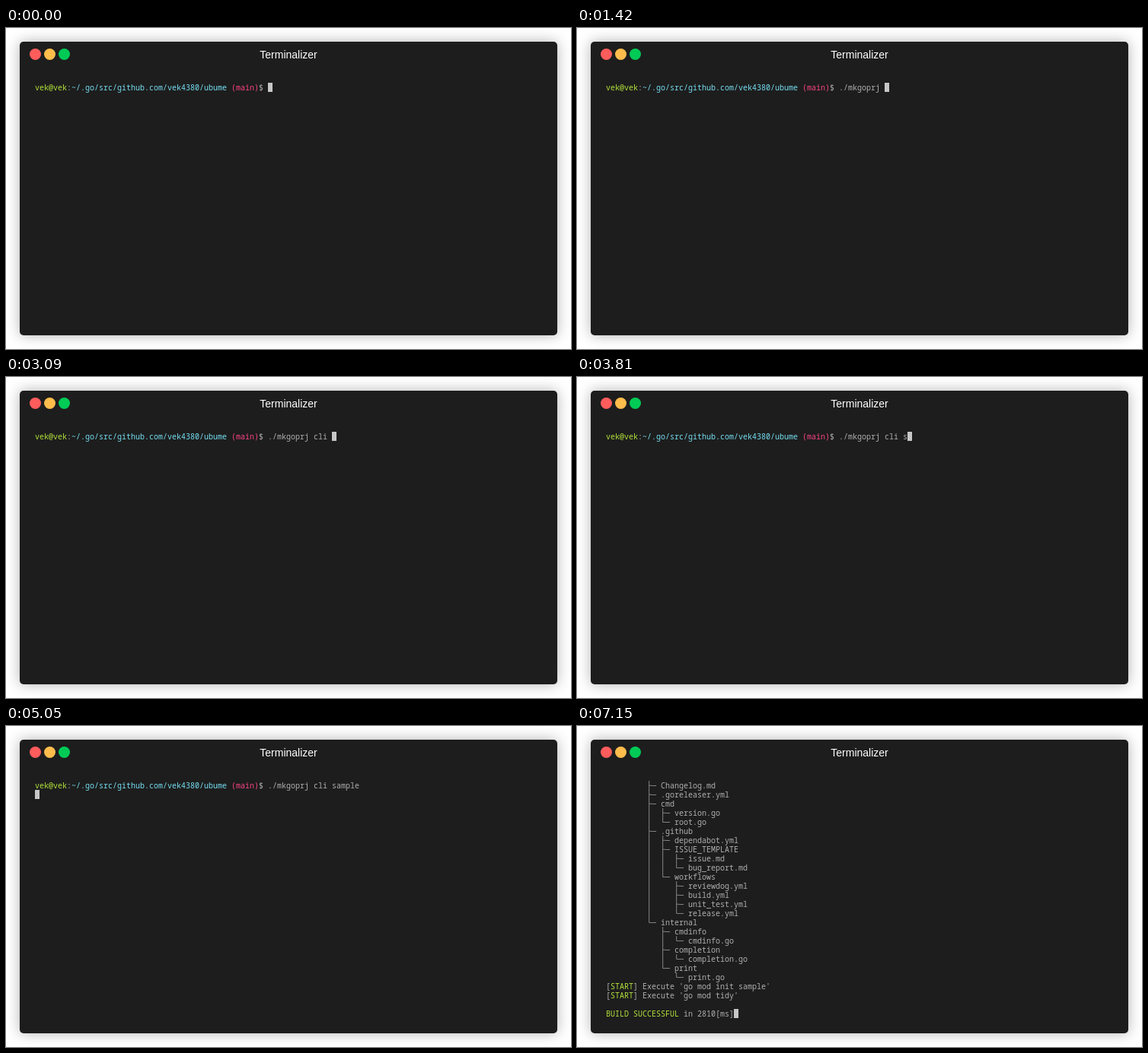
These frames come from a looping animation (742 px wide and 422 px high, 7.76 s). An HTML page:

```html
<!DOCTYPE html>
<html lang="en">
<head>
<meta charset="utf-8">
<title>Terminal session</title>
<style>
  html, body { margin: 0; width: 100%; height: 100%; overflow: hidden; background: #fff; }
  .window {
    position: absolute; left: 18px; top: 18px; width: 706px; height: 386px;
    border-radius: 5px; background: #1d1d1d; box-shadow: 0 0 18px rgba(0, 0, 0, .3);
  }
  .button { position: absolute; top: 9px; width: 15px; height: 15px; border-radius: 50%; }
  .title {
    position: absolute; top: 9px; width: 100%; text-align: center; color: #fff;
    font: 14px/16px "Liberation Sans", Arial, sans-serif;
  }
  pre {
    position: absolute; left: 20px; top: 54px; margin: 0; color: #afafaf;
    font: 10px/12px "Noto Sans Mono", "DejaVu Sans Mono", monospace;
    font-variant-ligatures: none;
  }
  .green { color: #b3e33b; }
  .blue { color: #75dff2; }
  .red { color: #fc4384; }
  #cursor { position: absolute; width: 6px; height: 12px; background: #c7c7c7; }
</style>
</head>
<body>
<div class="window">
  <div class="button" style="left:13px;background:#ff5c5c"></div>
  <div class="button" style="left:32px;background:#ffbd4c"></div>
  <div class="button" style="left:51px;background:#00ca56"></div>
  <div class="title">Terminalizer</div>
  <pre id="screen"></pre>
  <div id="cursor"></div>
</div>
<script>
const LOOP = 7760;
const ROWS = 26;
const screenEl = document.getElementById('screen');
const cursorEl = document.getElementById('cursor');

const paint = (color, text) => `<span class="${color}">${text}</span>`;
const start = command => `[${paint('green', 'START')}] Execute '${command}'`;

const prompt = paint('green', 'vek@vek') + ':' +
  paint('blue', '~/.go/src/github.com/vek4380/ubume') + ' ' + paint('red', '(main)') + '$ ';
const command = './mkgoprj cli sample';

const tree = `├─ Makefile
├─ Changelog.md
├─ .goreleaser.yml
├─ cmd
│  ├─ version.go
│  └─ root.go
├─ .github
│  ├─ dependabot.yml
│  ├─ ISSUE_TEMPLATE
│  │  ├─ issue.md
│  │  └─ bug_report.md
│  └─ workflows
│     ├─ reviewdog.yml
│     ├─ build.yml
│     ├─ unit_test.yml
│     └─ release.yml
└─ internal
   ├─ cmdinfo
   │  └─ cmdinfo.go
   ├─ completion
   │  └─ completion.go
   └─ print
      └─ print.go`.split('\n').map(line => ' '.repeat(9) + line);

const output = [...tree, start('go mod init sample'), start('go mod tidy'), ''];
const finished = [...output, paint('green', 'BUILD SUCCESSFUL') + ' in 2810[ms]'];

// Time and number of typed characters; the jump to 10 is a tab completion.
const typing = [
  [0, 0], [530, 1], [750, 2], [1100, 3], [1220, 4], [1420, 10], [2570, 11], [2710, 12],
  [2930, 13], [3090, 14], [3810, 15], [4020, 16], [4130, 17], [4270, 18], [4440, 19], [4670, 20]
];
const steps = [
  ...typing.map(([time, count]) => [time, [prompt + command.slice(0, count)]]),
  [5050, [prompt + command, '']],
  [5150, output],
  [7150, finished]
];

function show(lines) {
  const visible = lines.slice(-ROWS);
  const lastLine = visible[visible.length - 1].replace(/<[^>]*>/g, '');
  screenEl.innerHTML = visible.join('\n');
  cursorEl.style.left = 20 + lastLine.length * 6 + 'px';
  cursorEl.style.top = 54 + (visible.length - 1) * 12 + 'px';
}

let shown;
function frame() {
  const time = performance.now() % LOOP;
  const step = steps.filter(([begin]) => begin <= time).pop();
  if (step !== shown) {
    shown = step;
    show(step[1]);
  }
  requestAnimationFrame(frame);
}
frame();
</script>
</body>
</html>
```
